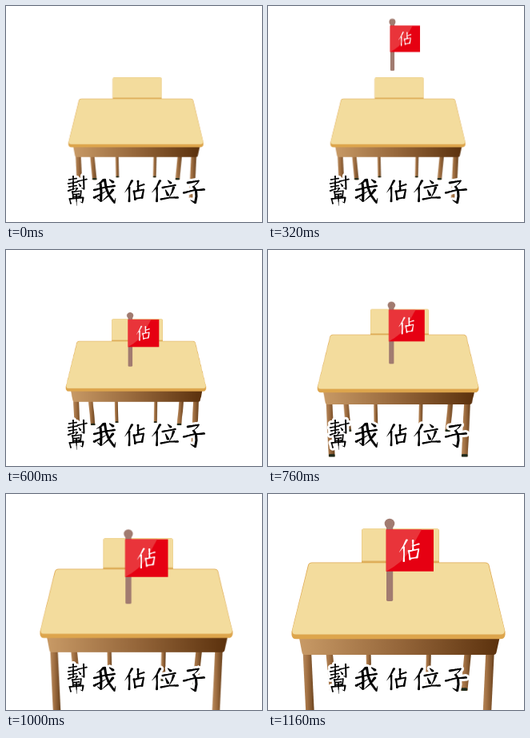
Recreate the animation shown at these times as an HTML page. Size 320 by 270 pixels, loop 1.6 s.

```html
<!DOCTYPE html>
<html lang="zh-Hant">
<head>
<meta charset="utf-8">
<title>幫我佔位子</title>
<style>
  html, body { margin: 0; width: 100%; height: 100%; overflow: hidden; background: #fff; }
  svg { display: block; width: 100vw; height: 100vh; }
  #scene, #flag { transform-origin: 0 0; }
  #words path { fill: #000; stroke: #fff; stroke-width: 6; stroke-linejoin: round; paint-order: stroke; }
</style>
</head>
<body>
<svg viewBox="0 0 320 270" role="img" aria-label="幫我佔位子">
  <defs>
    <linearGradient id="wood">
      <stop offset="0" stop-color="#c89a66"/>
      <stop offset=".5" stop-color="#95663a"/>
      <stop offset="1" stop-color="#5b310d"/>
    </linearGradient>
    <linearGradient id="legWood">
      <stop offset="0" stop-color="#b98a5c"/>
      <stop offset=".4" stop-color="#a06f42"/>
      <stop offset="1" stop-color="#67401c"/>
    </linearGradient>
  </defs>
  <g id="scene">
    <g id="legs"></g>
    <path d="M39 180H289.500L285.500 198Q285 201 281.500 201H46Q43 201 42.500 198Z" fill="url(#wood)"/>
    <path d="M120.500 43.300H210.500Q214 43.300 214 46V86H117V46Q117 43.300 120.500 43.300Z" fill="#dfb25f"/>
    <path d="M120.500 43.300H210.500Q213.700 43.300 213.700 46V83.500H117.300V46Q117.300 43.300 120.500 43.300Z" fill="#f3dc9d"/>
    <path d="M55 85.500H271.500Q275.500 85.500 276.500 89L296.500 172V176Q296 181.300 290.500 181.300H35Q30 181.300 29.500 176V172L50 89Q51 85.500 55 85.500Z" fill="#dda54c"/>
    <path d="M55 86.200H271.500Q275 86.200 275.700 89L295.700 170Q296.500 175.500 290.500 175.500H35Q29.500 175.500 30.400 170L50.800 89Q51.600 86.200 55 86.200Z" fill="#f3dc9d"/>
    <g id="flag">
      <rect x="148" y="38" width="8.200" height="96" rx="1.800" fill="#a17b70"/>
      <circle cx="152" cy="37" r="6.300" fill="#a17b70"/>
      <rect x="147.700" y="44.500" width="59.300" height="52.200" fill="#e60012"/>
      <path d="M147.700 44.500H192L178 70Q168 86 147.700 96.700Z" fill="#e9343a"/>
      <path id="flagWord" fill="#fff" transform="translate(177 70.500) scale(1.03) translate(-161 -231)"/>
    </g>
  </g>
  <g id="words"></g>
</svg>
<script>
const NS = "http://www.w3.org/2000/svg";
const $ = id => document.getElementById(id);

function add(parent, tag, attrs) {
  const el = document.createElementNS(NS, tag);
  for (const k in attrs) el.setAttribute(k, attrs[k]);
  return parent.appendChild(el);
}

// Legs lean inwards by `lean` on the way down; bottoms carry a dark foot
function leg(x, w, lean, bottom) {
  const foot = w * 0.45, end = x + lean;
  add($("legs"), "path", {
    d: `M${x} 195h${w}L${end + w} ${bottom}h${-w}Z`, fill: "url(#legWood)"
  });
  add($("legs"), "rect", {
    x: end, y: bottom - foot, width: w, height: foot, rx: 2, fill: "#1f2a1c"
  });
}

const MIDDLE = 163.2;
[[122.5, 6, 1, 241], [72, 8.5, 5, 246], [43.5, 10.5, 4.5, 288]].forEach(([x, w, lean, bottom]) => {
  leg(x, w, lean, bottom);
  leg(2 * MIDDLE - x - w, w, -lean, bottom);
});

// Brush pressure along a stroke: even, tapering, dot, hooked
const pressure = {
  e: u => 1.05 - 0.3 * Math.sin(Math.PI * u),
  t: u => 1.15 - 0.9 * u,
  d: u => 0.5 + 0.75 * u,
  k: u => u < 0.75 ? 1 : 1 - (u - 0.75) * 3
};

// Strokes are written as a pressure letter followed by points
const glyphs = {
  幫: [2.2, "e79,217 88,215.5", "e84,213 84,221", "e78,222 89,220", "e79,226 88,224.5",
    "e84,222 84,229", "t78,231 89,227", "e90,219 101,216.5", "k97,212.5 97.5,229 94,227",
    "d91,222 93,225", "t89,228 86,232", "e83,232 84,239", "e83,232.5 94,231 93,238",
    "e85,235.5 91,235", "e84,238.5 92,238", "e79.5,241 81,247",
    "k80,241 96.500,239.5 95.5,246 92.5,244.5", "t88,236 88.3,249.5"],
  我: [3.2, "t122,217.500 118,221 113,223.5", "e110.5,230 122,227 135.5,225",
    "k118,221 119,232 118.7,244 114,240.5", "t110.5,239.5 117,236 125,231.5",
    "k123.5,217 125,227 129,237 135.5,246 137,240", "t133.5,230 128,237 120,244",
    "d129.5,217 133.5,220"],
  佔: [2.9, "t157.5,218.5 153.5,226 148.5,233", "e154,227 154.3,236 154,244",
    "e165,219 165.2,230", "e165,225.5 172.5,223", "e160,231.5 161.5,242",
    "e160,232 172,229.5 170,240", "e161.5,241 170,239.5"],
  位: [3, "t192.5,218.5 188.5,226 182.5,233", "e188.5,227 188.8,236 188.5,244",
    "d202.5,218 206,221.5", "e196,227 211.5,224", "d199.5,230 202.5,236.5",
    "t209.5,227 207.5,233 204,239", "e194,241.5 204,239.7 214.5,239.5"],
  子: [3.2, "t227.5,221 241,218.5 239,221.5 234,226",
    "k234.5,226 237.5,231 238,238 236.5,246 230.5,242.5", "e222.5,233.5 234,230.5 247.5,229.5"]
};

// Flattened nib: upright strokes come out heavier than level ones
function dab(x, y, r) {
  const half = `a${r} ${(r * 0.78).toFixed(2)} 0 1 0 `;
  return `M${(x - r).toFixed(2)} ${y.toFixed(2)}${half}${2 * r} 0${half}${-2 * r} 0`;
}

function brush(stroke, weight) {
  const press = pressure[stroke[0]];
  const pts = stroke.slice(1).split(" ").map(p => p.split(",").map(Number));
  const lens = pts.slice(1).map((p, i) => Math.hypot(p[0] - pts[i][0], p[1] - pts[i][1]));
  const total = lens.reduce((a, b) => a + b);
  let d = "", done = 0;
  lens.forEach((len, i) => {
    const [x, y] = pts[i], [x2, y2] = pts[i + 1];
    for (let s = 0; s <= len; s += 0.5) {
      const f = s / len;
      const r = +(weight / 2 * press((done + s) / total)).toFixed(2);
      d += dab(x + (x2 - x) * f, y + (y2 - y) * f, r);
    }
    done += len;
  });
  return d;
}

const write = (name, scale = 1) => {
  const [weight, ...strokes] = glyphs[name];
  return strokes.map(s => brush(s, weight * scale)).join("");
};

for (const name in glyphs) add($("words"), "path", { d: write(name) });
$("flagWord").setAttribute("d", write("佔", 0.85));

const loop = { duration: 1600, iterations: Infinity };
const LANDED = 560 / 1600, GROWN = 1160 / 1600;
const zoom = s => `translate(161.3px, 168px) scale(${s}) translate(-161.3px, -168px)`;
const drop = y => `translate(0px, ${y}px)`;

$("flag").animate([
  { transform: drop(-241.5), easing: "steps(14, end)" },
  { transform: drop(0), offset: LANDED },
  { transform: drop(0) }
], loop);

$("scene").animate([
  { transform: zoom(0.632) },
  { transform: zoom(0.632), offset: LANDED, easing: "steps(15, end)" },
  { transform: zoom(1), offset: GROWN },
  { transform: zoom(1) }
], loop);
</script>
</body>
</html>
```
